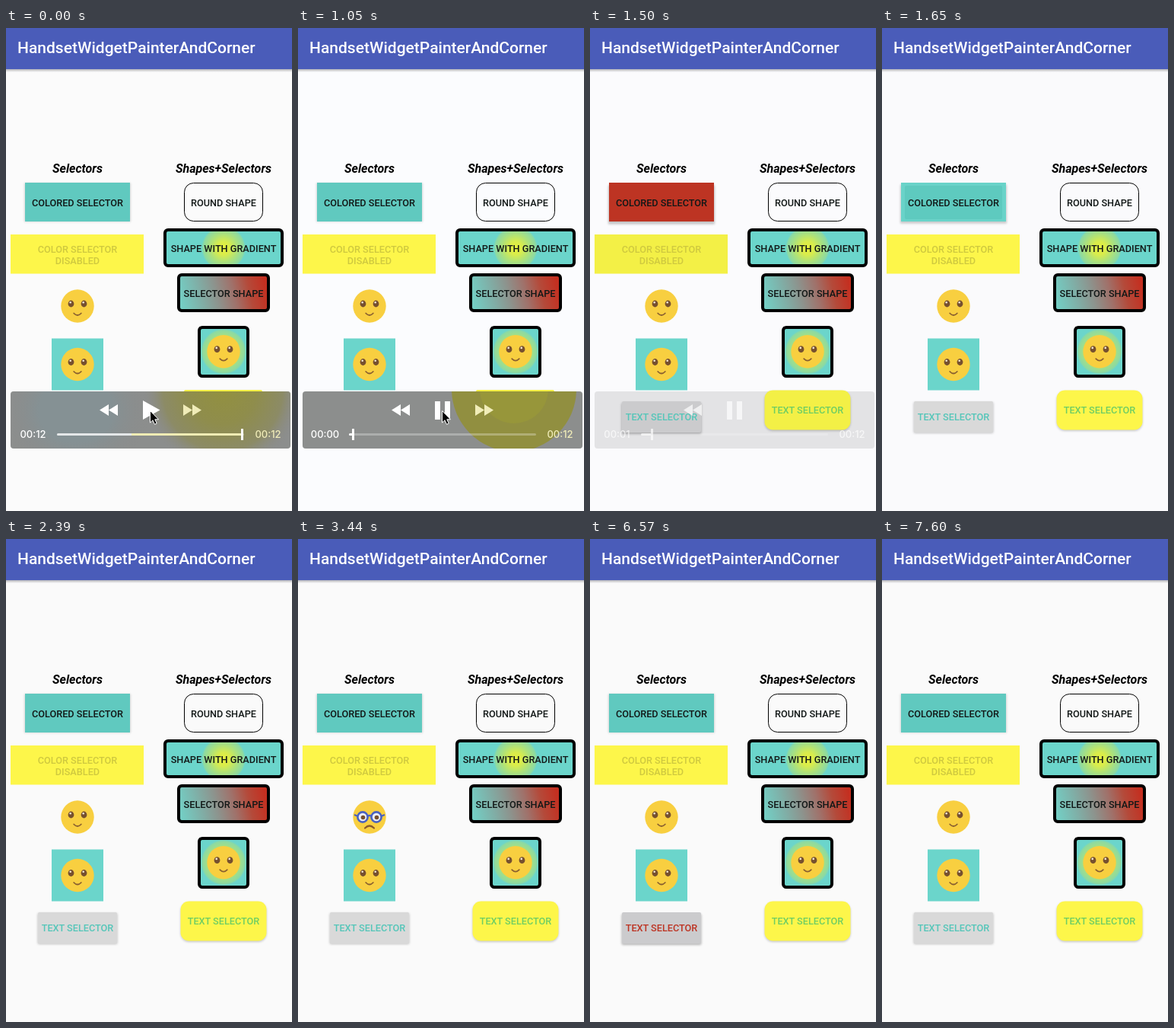
An HTML page for the animation above (8000 ms loop, 376 px wide and 634 px high).

```html
<!DOCTYPE html>
<html lang="en">
<head>
<meta charset="utf-8">
<title>Button styles</title>
<style>
  html, body { margin: 0; width: 100%; height: 100%; overflow: hidden; background: #fafafa; }
  svg { display: block; width: 376px; height: 634px; }
  text { font: 500 12.7px Roboto, sans-serif; text-anchor: middle; }
  .title { font-size: 21px; text-anchor: start; fill: #fff; }
  .head { font: italic 700 16px Roboto, sans-serif; }
  .label { fill: #121817; }
  .off { fill: #cfc93f; }
  .clock { font: 500 13px Inter, sans-serif; }
  .frame { fill: none; stroke: #000; stroke-width: 4; }
</style>
</head>
<body>
<svg viewBox="0 0 376 634">
  <defs>
    <radialGradient id="glow">
      <stop offset="0" stop-color="#e6f03c"/>
      <stop offset=".3" stop-color="#d9ec4c"/>
      <stop offset=".6" stop-color="#b0e277"/>
      <stop offset=".92" stop-color="#8cdaa2"/>
      <stop offset="1" stop-color="#6bd5cb"/>
    </radialGradient>
    <linearGradient id="blend" gradientUnits="userSpaceOnUse" x1="231" y1="361" x2="341" y2="336">
      <stop offset="0" stop-color="#74cdc3"/>
      <stop offset=".22" stop-color="#7fb0a8"/>
      <stop offset=".42" stop-color="#8d938d"/>
      <stop offset=".62" stop-color="#a0716a"/>
      <stop offset=".8" stop-color="#b44a3a"/>
      <stop offset="1" stop-color="#c42f20"/>
    </linearGradient>
    <radialGradient id="haze" gradientUnits="userSpaceOnUse" cx="285" cy="476" r="105">
      <stop offset="0" stop-color="#929040"/>
      <stop offset=".42" stop-color="#8f8d4c"/>
      <stop offset=".75" stop-color="#8c8b66"/>
      <stop offset="1" stop-color="#8b8b8b" stop-opacity="0"/>
    </radialGradient>
    <radialGradient id="mist">
      <stop offset=".5" stop-color="#859194"/>
      <stop offset="1" stop-color="#8b8b8b" stop-opacity="0"/>
    </radialGradient>
    <linearGradient id="trackTint" gradientUnits="userSpaceOnUse" x1="67" x2="313">
      <stop offset=".4" stop-color="#e4e7e8"/>
      <stop offset=".4" stop-color="#efecb4"/>
    </linearGradient>
    <linearGradient id="drop" x2="0" y2="1">
      <stop offset="0" stop-color="#b4b4b8"/>
      <stop offset="1" stop-color="#b4b4b8" stop-opacity="0"/>
    </linearGradient>
    <filter id="soft" x="-10%" y="-20%" width="120%" height="150%">
      <feGaussianBlur stdDeviation="1.6"/>
    </filter>
    <clipPath id="panelBox"><rect x="6" y="477" width="368" height="75" rx="4"/></clipPath>

    <g id="smile">
      <circle r="21.7" fill="#f8cf40"/>
      <g id="eye">
        <ellipse cx="-8.5" cy="-3" rx="3.9" ry="4.4" fill="#76502f"/>
        <circle cx="-9.3" cy="-4.8" r="1.3" fill="#f4ead8"/>
      </g>
      <use href="#eye" x="17"/>
      <path d="M-4.8 9.500Q0 14.500 4.800 9.500" fill="none" stroke="#8a6030" stroke-width="1.8" stroke-linecap="round"/>
    </g>
    <g id="frown">
      <circle r="21.7" fill="#f8cf40"/>
      <path d="M-20-3L-15-1M20-3L15-1M-3-1Q0-3 3-1" fill="none" stroke="#4a62c0" stroke-width="2.4"/>
      <g id="lens">
        <circle cx="-9" r="6.6" fill="#eceef4" stroke="#4a62c0" stroke-width="2.6"/>
        <circle cx="-8.5" cy=".5" r="2.8" fill="#76502f"/>
      </g>
      <use href="#lens" x="18"/>
      <path d="M-6 14.5Q0 8.5 6 14.5" fill="none" stroke="#8a5a2c" stroke-width="2.2" stroke-linecap="round"/>
    </g>
  </defs>

  <rect id="page" width="376" height="634" fill="#fafafa"/>
  <rect y="54" width="376" height="4" fill="url(#drop)"/>
  <rect width="376" height="54" fill="#4a5cb9"/>
  <text class="title" x="15" y="32.5">HandsetWidgetPainterAndCorner</text>

  <text class="head" x="94" y="190">Selectors</text>
  <text class="head" x="286" y="190">Shapes+Selectors</text>

  <rect id="colorShade" x="24" width="140" height="51" fill="#000" filter="url(#soft)"/>
  <rect id="color" x="25" y="203" width="138" height="51"/>
  <rect id="ripple" x="30" y="207" width="128" height="44" rx="2" fill="#5ecabf"/>
  <text class="label" x="94" y="233.7">COLORED SELECTOR</text>

  <rect id="disabled" x="6" y="271" width="175" height="51.5"/>
  <text class="off" x="94" y="294.5">COLOR SELECTOR</text>
  <text class="off" x="94" y="309.5">DISABLED</text>

  <use id="face1" x="94" y="365"/>
  <rect x="60" y="407.5" width="68" height="68" fill="#6bd5cb"/>
  <use id="face2" x="94" y="441.5"/>

  <rect x="234.5" y="203.5" width="103" height="50" rx="12" fill="none" stroke="#000"/>
  <text class="label" x="286" y="233.7">ROUND SHAPE</text>

  <rect x="209" y="265" width="154" height="47" rx="4" fill="#6bd5cb"/>
  <circle cx="286" cy="289" r="29" fill="url(#glow)" clip-path="inset(6px 0)"/>
  <rect class="frame" x="209" y="265" width="154" height="47" rx="4"/>
  <text class="label" x="286" y="293.5">SHAPE WITH GRADIENT</text>

  <rect x="227" y="324" width="118" height="47" rx="4" fill="url(#blend)"/>
  <rect class="frame" x="227" y="324" width="118" height="47" rx="4"/>
  <text class="label" x="286" y="353">SELECTOR SHAPE</text>

  <rect x="254" y="393" width="64" height="64" rx="4" fill="#6bd5cb"/>
  <circle cx="286" cy="424.7" r="30" fill="url(#glow)"/>
  <rect class="frame" x="254" y="393" width="64" height="64" rx="4"/>
  <use href="#smile" x="286" y="424.7"/>

  <rect id="edge" x="234" y="475" width="103" height="4" rx="2" fill="#f3ef45"/>
  <g id="panel" clip-path="url(#panelBox)">
    <rect x="6" y="477" width="368" height="75" fill="#8c8e8d"/>
    <g id="hazeSoft">
      <ellipse cx="92" cy="502" rx="98" ry="84" fill="url(#mist)"/>
      <circle cx="285" cy="476" r="105" fill="url(#haze)"/>
    </g>
    <g id="hazeHard">
      <circle cx="284" cy="474" r="82" fill="#918f40"/>
      <circle cx="284" cy="474" r="45" fill="#97963a"/>
    </g>
  </g>

  <g id="textButtons">
    <rect id="textShade" x="41.5" width="105" height="41" rx="2" fill="#000" filter="url(#soft)"/>
    <rect id="grey" x="42" y="490" width="104" height="41" rx="2"/>
    <text id="greyText" x="94" y="515">TEXT SELECTOR</text>
    <rect x="229.5" y="477" width="113" height="52" rx="11" fill="#000" opacity=".2" filter="url(#soft)"/>
    <rect id="rounded" x="229.5" y="475.5" width="113" height="52" rx="11"/>
    <text x="286" y="506.3" fill="#6fce63">TEXT SELECTOR</text>
  </g>

  <g id="controls" fill="#fff">
    <path d="M123 501.5L135 494V509ZM135 501.5L147 494V509Z"/>
    <path id="next" d="M257 501.5L245 494V509ZM245 501.5L233 494V509Z"/>
    <path id="play" d="M180 489L202.500 501.5L180 514Z"/>
    <path id="pause" d="M180 490h7v24h-7zM193 490h7v24h-7z"/>
    <text id="clock" class="clock" x="35.500" y="538.3"></text>
    <text id="total" class="clock" x="344.500" y="538.3">00:12</text>
    <rect id="track" x="67" y="532" width="246" height="3" rx="1.500" opacity=".28"/>
    <rect id="done" x="67" y="532" height="3" rx="1.500"/>
    <rect id="knob" y="526" width="3" height="15" rx=".5"/>
  </g>
  <path id="cursor" d="M189.500 502.500V518L193 514.800L195.500 520.300L198.200 519L195.800 513.800H200.500Z" fill="#000" stroke="#fff"/>
</svg>
<script>
const LOOP = 8000;
const $ = id => document.getElementById(id);
const set = (id, attrs) => {
  for (const [key, value] of Object.entries(attrs)) $(id).setAttribute(key, value);
};
const show = (id, on) => set(id, { visibility: on ? 'visible' : 'hidden' });

// Each step changes only the listed values; the rest carry over.
const steps = [
  [0, { page: '#fbfbfb', panel: 1, icons: 1, mode: 'play', dim: 1, knob: 310, clock: '00:12',
        warm: true, cursor: true, buttons: false, color: '#60c9bf', lift: 0, ripple: false,
        yellow: '#fdf64a', face1: 'smile', face2: 'smile', press: 0, ink: '#55c6b9' }],
  [750, { dim: .75 }],
  [900, { mode: 'pause', dim: 1 }],
  [1050, { page: '#fbfcfe', knob: 72, clock: '00:00', warm: false }],
  [1200, { knob: 76, cursor: false }],
  [1350, { page: '#fbfbfd', panel: .65, icons: .85, knob: 78, clock: '00:01' }],
  [1500, { panel: .22, icons: .7, knob: 81, buttons: true, color: '#bd3423', lift: 1, press: .5,
           yellow: '#f3f046' }],
  [1650, { page: '#fafafc', panel: 0, icons: 0, color: '#69d3c9', lift: .7, ripple: true, press: 0,
           yellow: '#fdf64a' }],
  [1790, { page: '#fafafa', color: '#60c9bf', lift: 0, ripple: false }],
  [3440, { face1: 'frown' }],
  [3880, { face1: 'smile' }],
  [5220, { face2: 'frown' }],
  [5670, { face2: 'smile' }],
  [6570, { press: .5, ink: '#bd3423' }],
  [6720, { press: 1 }],
  [6870, { press: .5, ink: '#55c6b9' }],
  [7010, { press: 0 }]
];

let state = {};
const timeline = steps.map(([at, change]) => ({ at, look: state = { ...state, ...change } }));
const greys = { 0: '#d9d9d9', 0.5: '#cbcbcd', 1: '#c2c2c4' };

function draw(s) {
  set('page', { fill: s.page });
  set('color', { fill: s.color });
  set('colorShade', { y: 203.5 + 3 * s.lift, opacity: .14 + .08 * s.lift });
  show('ripple', s.ripple);
  for (const id of ['disabled', 'rounded']) set(id, { fill: s.yellow });
  for (const id of ['face1', 'face2']) set(id, { href: '#' + s[id] });

  set('panel', { opacity: s.panel });
  show('hazeSoft', s.warm);
  show('hazeHard', !s.warm && !s.buttons);
  show('edge', !s.buttons);
  show('textButtons', s.buttons);
  set('grey', { fill: greys[s.press] });
  set('greyText', { fill: s.ink });
  set('textShade', { y: 491 + 2 * s.press, opacity: .2 + .1 * s.press });

  set('controls', { opacity: s.icons });
  show('play', s.mode === 'play');
  show('pause', s.mode === 'pause');
  show('next', !s.buttons);
  set('play', { opacity: s.dim });
  $('clock').textContent = s.clock;
  set('knob', { x: s.knob - 1 });
  set('done', { width: s.knob - 67, fill: s.warm ? 'url(#trackTint)' : '#fff' });
  for (const id of ['next', 'total']) set(id, { fill: s.buttons ? '#fff' : '#f0ecb8' });
  show('cursor', s.cursor);
}

let shown, start;
function tick(now) {
  start ??= now;
  const t = (now - start) % LOOP;
  const { look } = timeline.findLast(step => step.at <= t);
  if (look !== shown) draw(shown = look);
  requestAnimationFrame(tick);
}
draw(shown = timeline[0].look);
requestAnimationFrame(tick);
</script>
</body>
</html>
```
